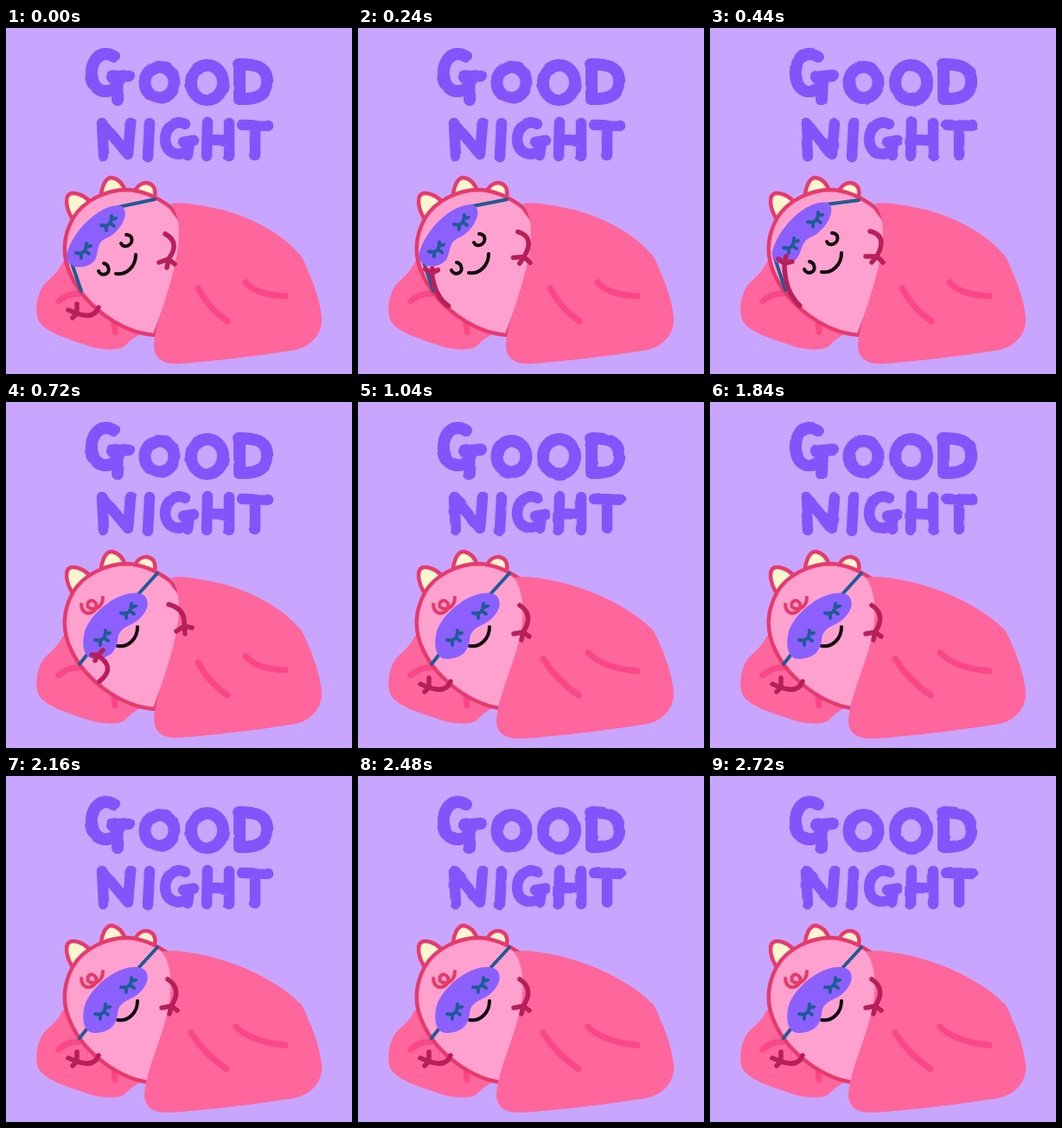
Write an HTML page that moves like this. It is 400 px wide and 400 px high and loops after 2.8 s.

```html
<!DOCTYPE html>
<html lang="en">
<head>
<meta charset="utf-8">
<title>Good night</title>
<style>
html, body { margin: 0; width: 100%; height: 100%; overflow: hidden; background: #c8a5ff; }
svg { display: block; width: 100%; height: 100%; fill: none; stroke-linecap: round; stroke-linejoin: round; }
.letters { stroke: #8454fb; }
.cloth { fill: #ff669b; }
.crease { stroke: #f94787; stroke-width: 7; }
.outline { stroke: #e63a6d; stroke-width: 4.5; }
.skin { fill: #ffa1cf; }
.spike { fill: #fff6cf; }
.face { stroke: #100a10; stroke-width: 4; }
.mask { fill: #8b60fe; }
.strap { stroke: #205b96; stroke-width: 4; }
.arm { stroke: #b71f5a; stroke-width: 5.5; }
</style>
</head>
<body>
<svg viewBox="0 0 400 400" role="img" aria-label="Good night">
  <defs>
    <filter id="boil" filterUnits="userSpaceOnUse" x="80" y="10" width="240" height="160" color-interpolation-filters="sRGB">
      <feTurbulence id="noise" type="fractalNoise" baseFrequency=".05" numOctaves="1"/>
      <feDisplacementMap in="SourceGraphic" scale="3" xChannelSelector="R" yChannelSelector="G"/>
    </filter>
    <path id="lashes" d="M-8 3Q4 6 4-8M-2 4L-2 9M3 1L7 4M4-4L9-5"/>
  </defs>

  <g class="letters" filter="url(#boil)">
    <g stroke-width="14">
      <path d="M125 33C110 24 98 37 99 54C101 76 119 77 128 67M123 57L142 55M130 58L129 83"/>
      <ellipse cx="177.5" cy="63" rx="17" ry="18"/>
      <ellipse cx="232.5" cy="63" rx="18.5" ry="20"/>
      <path d="M270 42L270 82C292 83 303 76 302 60C301 46 290 41 269 42"/>
    </g>
    <path stroke-width="12.5" d="M113 148L111 110L141 146L144 110M166 110L164 149M207 111C196 105 184 115 184 129C185 146 200 149 210 142M205 132L217 130M212 132L210 147M233 109L232 148M258 110L258 148M233 129L258 130M273 112L303 113M288 112L288 147"/>
  </g>

  <path class="cloth" d="M66 270C60 284 50 289 43 298C35 309 33 329 38 339C46 352 70 359 100 369C118 373 134 373 139 366C145 360 148 358 154 355L170 330L90 280Z"/>
  <path class="crease" d="M61 316Q70 307 85 307M125 342L126 351"/>

  <g class="outline">
    <path class="spike" d="M77 221C70 210 66 193 76 191C86 190 96 198 101 206M110 192C112 179 117 172 123 173C131 175 136 182 138 189M149 189C152 181 160 177 166 180C172 182 174 190 171 197"/>
    <path class="skin" d="M78 219C90 200 115 187 140 187C160 188 178 198 190 207L215 240L172 355C130 352 91 319 76 288C63 262 66 240 78 219Z"/>
    <path stroke-width="4" d="M87 234Q88 245 97 244Q106 241 104 233C100 226 92 231 95 237C101 242 112 238 112 226"/>
  </g>

  <path class="face" id="face" d="M107 281C109 288 122 285 118 276Q117 273 113 272M133 249C136 256 148 251 145 242Q143 239 139 239M127 284C139 286 150 276 150 262"/>
  <path class="strap" id="strap"/>
  <path class="mask" id="mask"/>
  <use class="strap" id="lashL" href="#lashes"/>
  <use class="strap" id="lashR" href="#lashes"/>
  <path class="cloth" id="blanket"/>
  <path class="crease" id="folds"/>
  <path class="arm" id="armL"/>
  <path class="arm" id="armR"/>
</svg>

<script>
const LOOP = 2800;
const $ = id => document.getElementById(id);

// Each track: attribute, then [time, value] keys; numbers inside values are blended.
const tracks = {
  face: ['transform', [80, 'translate(0 0)'], [400, 'translate(2 -2)']],
  strap: ['d',
    [160, 'M130 207L172 198M76 272L87 304'],
    [400, 'M134 204L172 199M75 266L87 303'],
    [440, 'M134 204L172 199M75 266L87 303'],
    [640, 'M153 222L175 198M97 288L85 303']],
  mask: ['d',
    [160, 'M134 206C115 200 78 230 70 262C68 280 95 280 103 268C108 258 104 248 116 243C130 238 145 215 134 206Z'],
    [400, 'M136 202C115 198 82 225 72 258C70 274 88 277 100 267C108 257 104 247 118 241C133 235 148 209 136 202Z'],
    [440, 'M136 202C115 198 82 225 72 258C70 274 88 277 100 267C108 257 104 247 118 241C133 235 148 209 136 202Z'],
    [640, 'M160 224C146 213 108 230 92 262C86 280 90 297 102 297C116 297 127 291 129 276C130 262 138 261 150 254C162 246 168 232 160 224Z']],
  lashL: ['transform', [160, 'translate(89 257)'], [400, 'translate(93 251)'], [440, 'translate(93 251)'], [640, 'translate(111 272)']],
  lashR: ['transform', [160, 'translate(118 225)'], [400, 'translate(121 221)'], [440, 'translate(121 221)'], [640, 'translate(141 241)']],
  blanket: ['d',
    [760, 'M191 203C200 201 215 203 235 207C281 215 323 240 342 265C352 285 363 312 365 335C366 352 355 367 335 372C300 378 235 386 200 388C180 389 172 381 171 368C172 340 190 305 197 265C202 240 201 218 191 203Z'],
    [1040, 'M180 203C192 201 210 203 228 207C275 217 320 241 342 265C352 285 363 312 365 335C366 352 355 367 335 372C300 378 235 386 190 389C168 390 160 381 160 368C162 340 180 305 187 272C193 245 192 218 180 203Z']],
  folds: ['d',
    [760, 'M222 301Q235 325 256 339M277 294Q290 309 323 310'],
    [1040, 'M214 297Q230 322 255 339M266 290Q285 308 323 311']],
  armL: ['d',
    [40, 'M107 323Q102 337 82 330M72 326L82 330L77 335M82 330L82 319'],
    [320, 'M104 321Q86 305 86 272M79 267L86 272L88 264M86 272L95 270'],
    [440, 'M104 321Q86 305 86 272M79 267L86 272L88 264M86 272L95 270'],
    [640, 'M108 323Q128 307 106 293M99 292L106 293L103 299M106 293L112 287'],
    [720, 'M108 323Q128 307 106 293M99 292L106 293L103 299M106 293L112 287'],
    [1000, 'M107 323Q102 337 82 330M72 326L82 330L77 335M82 330L82 319']],
  armR: ['d',
    [40, 'M184 238Q202 248 188 267M177 271L188 267L186 277M188 267L195 273'],
    [320, 'M185 235Q206 240 193 264M180 264L193 264L187 271M193 264L200 271'],
    [440, 'M185 235Q206 240 193 264M180 264L193 264L187 271M193 264L200 271'],
    [640, 'M188 234Q208 239 206 259M197 265L206 259L207 268M206 259L215 261'],
    [760, 'M188 234Q208 239 206 259M197 265L206 259L207 268M206 259L215 261'],
    [1040, 'M187 235Q204 246 191 266M180 268L191 266L189 275M191 266L198 271']]
};

const ease = k => k * k * (3 - 2 * k);

function blend(from, to, k) {
  const goals = to.match(/-?[\d.]+/g);
  let i = 0;
  return from.replace(/-?[\d.]+/g, n => +n + (goals[i++] - n) * k);
}

function valueAt(keys, t) {
  const next = keys.findIndex(key => key[0] > t);
  if (next === 0) return keys[0][1];
  if (next < 0) return keys[keys.length - 1][1];
  const [t0, a] = keys[next - 1], [t1, b] = keys[next];
  return blend(a, b, ease((t - t0) / (t1 - t0)));
}

function draw(now) {
  const time = now % LOOP;
  const step = time >= 80 && time < 560 ? 40 : 80;
  const t = Math.floor(time / step) * step;
  for (const id in tracks) {
    const [attribute, ...keys] = tracks[id];
    $(id).setAttribute(attribute, valueAt(keys, t));
  }
  $('noise').setAttribute('seed', 3 + Math.floor(time / 80) % 3);
}

const start = performance.now();
function tick() {
  draw(performance.now() - start);
  requestAnimationFrame(tick);
}
tick();
</script>
</body>
</html>
```
